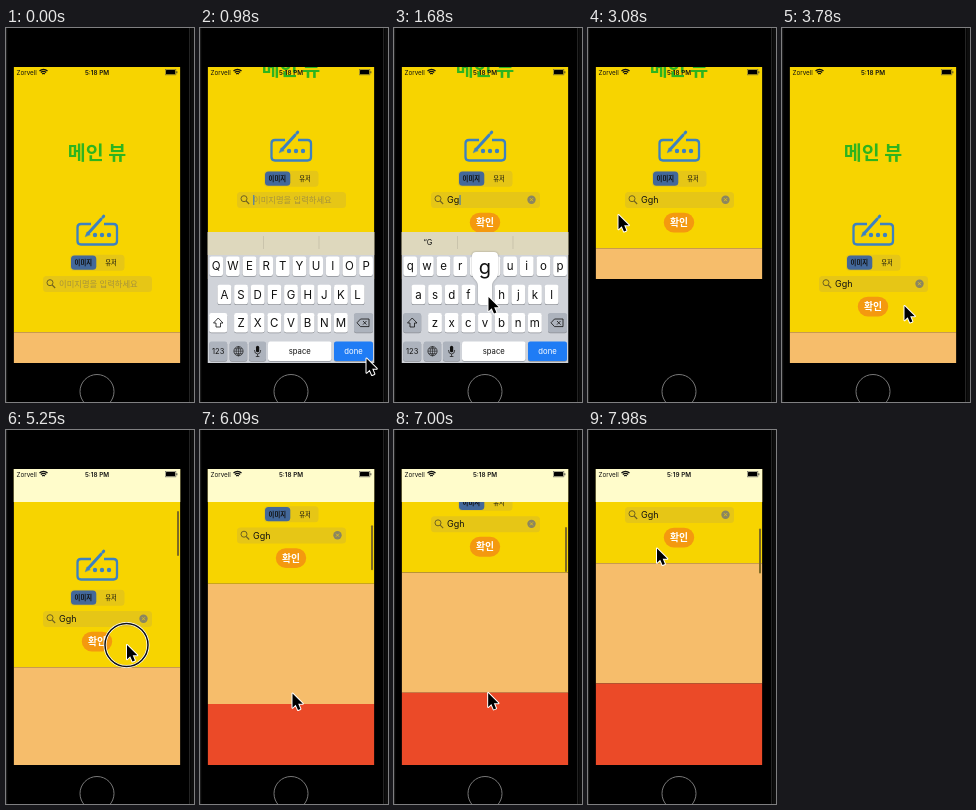
Recreate the animation shown at these times as an HTML page with a canvas. Size 188 by 374 pixels, loop 8000 ms.

```html
<!DOCTYPE html>
<html lang="ko">
<head>
<meta charset="utf-8">
<style>
html, body { margin: 0; width: 100%; height: 100%; overflow: hidden; background: #000; }
canvas { display: block; width: 188px; height: 374px; }
</style>
</head>
<body>
<canvas id="stage"></canvas>
<script>
const canvas = document.getElementById('stage');
const c = canvas.getContext('2d');
const ratio = window.devicePixelRatio || 1;
canvas.width = 188 * ratio;
canvas.height = 374 * ratio;

const LOOP = 8000, STEP = 70;
const FONT = 'Inter, "Noto Sans CJK KR", "Noto Sans CJK", sans-serif';
const YELLOW = '#f7d400', BLUE = '#3c81c2', INK = '#111';
const LEFT = 7.5, TOP = 39, WIDTH = 167, BOTTOM = 335;

// Tracks: [time, value, ...]
const keyboardTrack = [[0, 0], [140, .45], [280, .85], [420, 1], [2590, 1], [2730, .55], [2940, 0]];
const liftTrack = [[0, 0], [140, 38], [280, 71], [420, 84], [3150, 84], [3290, 40], [3500, 0]];
const scrollTrack = [[4130, 0], [4410, 25], [4760, 25], [5250, 67], [5460, 95], [5810, 95],
  [6090, 150.5], [6440, 157], [6650, 160], [6930, 160], [7350, 171]];
const cursorTrack = [[840, 190, 350], [1400, 94, 268], [1750, 94, 268], [1960, 110, 268],
  [2310, 110, 268], [2520, 150, 322], [2660, 150, 322], [3080, 30, 186], [3150, 30, 186],
  [3780, 122, 277], [4130, 122, 277], [4200, 121, 281], [4410, 121, 256], [4760, 121, 256],
  [5250, 120.5, 214], [5460, 120.5, 187], [5600, 120.5, 187], [5810, 92, 308],
  [6090, 92, 262.5], [6930, 92, 262.5], [7350, 102, 259], [7770, 102, 259], [7980, 68.5, 117.5]];
const typing = [[1540, 'G'], [1680, 'Gg'], [1960, 'Ggh']];

function at(track, t) {
  if (t <= track[0][0]) return track[0].slice(1);
  for (let i = 1; i < track.length; i++) {
    const a = track[i - 1], b = track[i];
    if (t <= b[0]) {
      const p = (t - a[0]) / (b[0] - a[0]);
      return a.slice(1).map((v, j) => v + (b[j + 1] - v) * p);
    }
  }
  return track[track.length - 1].slice(1);
}

function box(x, y, w, h, fill, r = 0) {
  c.fillStyle = fill;
  c.beginPath();
  c.roundRect(x, y, w, h, r);
  c.fill();
}

function disc(x, y, r, fill) {
  c.fillStyle = fill;
  c.beginPath();
  c.arc(x, y, r, 0, 7);
  c.fill();
}

function ring(x, y, r, color, width) {
  c.strokeStyle = color;
  c.lineWidth = width;
  c.beginPath();
  c.arc(x, y, r, 0, 7);
  c.stroke();
}

function path(d, color, width, fill) {
  const p = new Path2D(d);
  if (fill) { c.fillStyle = fill; c.fill(p); }
  if (width) { c.strokeStyle = color; c.lineWidth = width; c.stroke(p); }
}

// Text centred vertically on y
function label(s, x, y, size, color = INK, weight = 400, align = 'center') {
  c.font = `${weight} ${size}px ${FONT}`;
  c.textAlign = align;
  c.fillStyle = color;
  c.fillText(s, x, y + size * .37);
  return c.measureText(s).width;
}

function phone() {
  box(0, 0, 188, 374, '#000');
  box(184.5, 0, 3.5, 374, '#0d0d0d');
  path('M.7 0V374M183.5 0V374', '#242424', 1);
  ring(91, 363.5, 17, '#777', 1);
}

function statusBar(t) {
  label('Zorvell', 10.5, 44.3, 6.3, INK, 400, 'left');
  for (const r of [2, 4, 6]) {
    c.strokeStyle = INK;
    c.lineWidth = 1.3;
    c.beginPath();
    c.arc(37.5, 47.5, r, -2.3, -.84);
    c.stroke();
  }
  label(t < 7140 ? '5:18 PM' : '5:19 PM', 91, 44.3, 6.3, INK, 600);
  c.strokeStyle = '#555';
  c.lineWidth = .5;
  c.strokeRect(159.3, 41.5, 10.6, 5.4);
  box(160, 42.1, 9.2, 4.2, '#000', .6);
  box(170.4, 43.2, .9, 2, '#333');
}

function icon() {
  c.lineJoin = 'round';
  path('M85 196H75Q71.5 196 71.5 199.500V213Q71.5 216.500 75 216.500H107.500Q111 216.500 111 213V199.500Q111 196 107.500 196H98', BLUE, 2.3);
  c.lineCap = 'round';
  path('M82 205.500L97 189', YELLOW, 6);
  path('M82.500 205L95 191.200M97 189L97.700 188.200', BLUE, 3);
  path('M79.300 208.500L81 203.800L84 206.500Z', BLUE, .5, BLUE);
  c.lineCap = 'butt';
  for (const x of [89, 96, 103]) disc(x, 207, 2.2, BLUE);
}

function searchField(text, focused) {
  box(37, 248, 109, 16, '#e6c616', 3.5);
  ring(44, 254.7, 3, '#6f6220', 1);
  path('M46.200 257L49.200 260', '#6f6220', 1.1);
  let w = 0;
  if (text) {
    w = label(text, 53, 256, 9, INK, 400, 'left');
    disc(137.5, 255.7, 4.2, '#8b8660');
    path('M136 254.200L139 257.200M139 254.200L136 257.200', '#e6c616', .8);
  } else {
    label('이미지명을 입력하세요', 53, 255.7, 8.3, '#a6933b', 300, 'left');
  }
  if (focused) box(53.3 + w, 251, 1, 10, '#2a6fd0');
}

function content(t, text, focused, lift, scroll) {
  c.save();
  c.beginPath();
  c.rect(LEFT, TOP, WIDTH, BOTTOM - TOP - lift);
  c.clip();
  c.translate(0, -lift - scroll);
  box(LEFT, 0, WIDTH, 304.3, YELLOW);
  box(LEFT, 304.3, WIDTH, 120.2, '#f6bd6b');
  box(LEFT, 424.5, WIDTH, 150, '#eb4a28');
  label('메인 뷰', 91, 125, 19.5, '#2db41e', 700);
  icon();
  box(64, 226.7, 54.5, 16, '#e6c616', 3.5);
  box(65, 227.5, 25.3, 14.3, '#43689a', 3.5);
  label('이미지', 77.3, 234.7, 6.3, INK, 600);
  label('유저', 105, 234.7, 6.3, INK, 500);
  searchField(text, focused);
  if (text) {
    box(75.8, 268.7, 30.4, 19.8, '#f4990f', 9.9);
    label('확인', 91, 278.5, 9.8, '#fff', 700);
  }
  c.restore();
  if (t >= 4200) {
    box(LEFT, TOP, WIDTH, 33, '#fffccb');
    box(171, 69.7 + .169 * scroll, 2, 45, '#7d6a25', 1);
  }
}

function key(x, y, w, s, fill = '#fff', size = 11.5, color = INK) {
  box(x, y + .8, w, 19.5, '#8d9096', 2.2);
  box(x, y, w, 19.5, fill, 2.2);
  if (s) label(s, x + w / 2, y + 9.6, size, color);
}

function popup(t) {
  const tap = t >= 1540 && t < 1680 ? ['G', 91] : t >= 1680 && t < 1820 ? ['g', 91]
    : t >= 1960 && t < 2170 ? ['h', 107.7] : null;
  if (!tap) return;
  c.save();
  c.translate(tap[1], 0);
  c.shadowColor = 'rgba(0,0,0,.35)';
  c.shadowBlur = 2 * ratio;
  path('M-9 224H9Q13 224 13 228V245C13 251 7 252 7 258V274Q7 277 4 277H-4Q-7 277 -7 274V258C-7 252 -13 251 -13 245V228Q-13 224 -9 224Z', '', 0, '#fff');
  c.restore();
  label(tap[0], tap[1], 239, 20);
}

function keyboard(t, text, k) {
  if (!k) return;
  c.save();
  c.translate(0, (1 - k) * 132);
  box(LEFT, 204, WIDTH, 131, '#d0d3d9');
  box(LEFT, 204, WIDTH, 23, '#ded8bd');
  path('M63.500 208V221M119 208V221', '#c2bca5', .7);
  if (text) label('“' + (text.length > 2 ? text + '”' : 'G'), 34, 214.5, 7.5);
  const gray = '#adb3bd';
  [['qwertyuiop', 16.2, 228.5], ['asdfghjkl', 24.4, 256.8], ['zxcvbnm', 41, 285]].forEach(([row, x, y]) =>
    [...row].forEach((s, i) => key(x + i * 16.65 - 6.9, y, 13.8, text ? s : s.toUpperCase())));
  key(9.2, 285, 18, '', text ? gray : '#fff');
  path('M18.200 290L23 295H20.500V299H16V295H13.500Z', INK, .8);
  key(154, 285, 19, '', gray);
  path('M157 294.800L160.500 291H169V298.600H160.500ZM163 293L166.500 296.600M166.500 293L163 296.600', INK, .8);
  key(9.2, 313.5, 18, '123', gray, 7.5);
  key(29.7, 313.5, 17.5, '', gray);
  ring(38.5, 323.2, 4.6, INK, .7);
  path('M34 323.200H43M38.500 318.600V327.800M35 320.800H42M35 325.600H42M38.500 318.600C35.500 321 35.500 325.500 38.500 327.800C41.500 325.500 41.500 321 38.500 318.600', INK, .55);
  key(49, 313.5, 17, '', gray);
  box(56, 317.8, 3.2, 6.5, INK, 1.6);
  path('M54.500 322Q54.500 326 57.600 326Q60.700 326 60.700 322M57.600 326V328.500M55.800 328.500H59.400', INK, .7);
  key(68, 313.5, 63.5, 'space', '#fff', 7.7);
  key(134, 313.5, 39, 'done', '#1f7cf5', 7.7, '#fff');
  popup(t);
  c.restore();
}

function cursor(t) {
  if (t < 910) return;
  const [x, y] = at(cursorTrack, t);
  const held = t >= 4200 && t <= 5460 || t >= 5810 && t < 6090;
  if (held) {
    ring(x, y + 1, 21.5, '#fff', 3);
    ring(x, y + 1, 21.5, '#111', 1.5);
  }
  c.save();
  c.translate(x, y);
  c.lineJoin = 'round';
  path('M.500 1V15.200L3.700 12.200L6 17.500L8.400 16.500L6.200 11.300H10.800Z', '#fff', 2, '#000');
  path('M.500 1V15.200L3.700 12.200L6 17.500L8.400 16.500L6.200 11.300H10.800Z', '', 0, '#000');
  c.restore();
}

function draw(t) {
  const text = typing.reduce((s, [start, value]) => t >= start ? value : s, '');
  const [lift] = at(liftTrack, t), [scroll] = at(scrollTrack, t), [k] = at(keyboardTrack, t);
  c.setTransform(ratio, 0, 0, ratio, 0, 0);
  phone();
  c.save();
  c.beginPath();
  c.rect(LEFT, TOP, WIDTH, BOTTOM - TOP);
  c.clip();
  content(t, text, t >= 70 && t < 2660, lift, scroll);
  statusBar(t);
  keyboard(t, text, k);
  c.restore();
  cursor(t);
}

function frame() {
  draw(Math.floor(performance.now() % LOOP / STEP) * STEP);
  requestAnimationFrame(frame);
}
frame();
</script>
</body>
</html>
```
